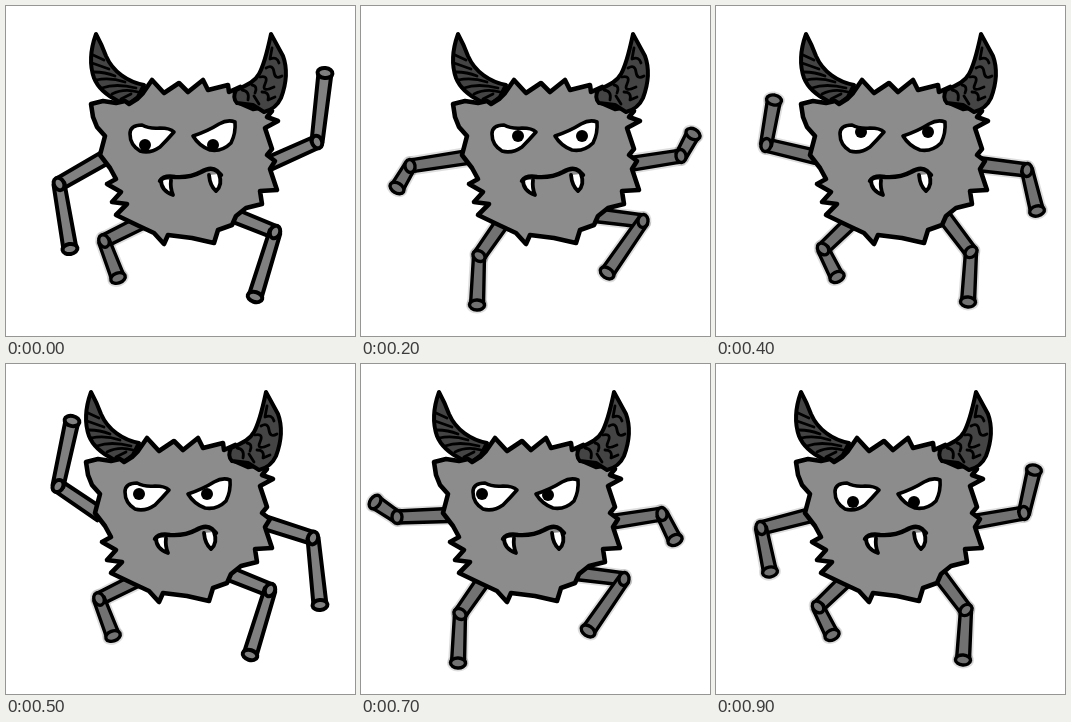
Recreate the animation shown at these times as an HTML page with a canvas. Size 349x330 px, loop 1000 ms.

```html
<!DOCTYPE html>
<html lang="en">
<head>
<meta charset="utf-8">
<title>Dancing monster</title>
<style>
  html, body { margin: 0; width: 100%; height: 100%; overflow: hidden; background: #fff; }
  canvas { display: block; width: 349px; height: 330px; }
</style>
</head>
<body>
<canvas id="stage" width="349" height="330"></canvas>
<script>
const ctx = document.getElementById('stage').getContext('2d');
ctx.lineJoin = ctx.lineCap = 'round';

const STEP = 100, STEPS = 10;
const FUR = '#8c8c8c', HORN = '#444', LIMB = '#808080', SOFT_LIMB = '#727272';

// Sideways sway of the body
const sway = [0, 5, 7, 5, 0, -5, -9, -12, -9, -5];

// Elbow x, y, hand x, y on the stage
const leftArm = [
  [53, 178, 64, 243], [54, 165, 62, 208], [49, 160, 36, 182], [50, 152, 30, 138],
  [50, 139, 58, 94], [52, 122, 66, 57], [44, 138, 50, 94], [36, 153, 14, 138],
  [36, 160, 22, 182], [45, 164, 54, 208]
];
const rightArm = [
  [311, 136, 319, 67], [318, 151, 326, 107], [320, 150, 332, 128], [318, 149, 325, 176],
  [311, 164, 321, 205], [307, 174, 314, 241], [303, 163, 313, 205], [301, 150, 314, 176],
  [302, 150, 318, 128], [308, 149, 318, 106]
];

// Knee x, y, foot x, y relative to the body; the step repeats twice per loop
const leftLeg = [
  [98, 235, 112, 272], [107, 246, 113, 288], [111, 250, 109, 299],
  [118, 251, 140, 280], [107, 243, 121, 271]
];
const rightLeg = [
  [269, 226, 249, 291], [276, 214, 254, 274], [275, 215, 239, 267],
  [270, 230, 235, 281], [255, 246, 252, 296]
];

// Left pupil x, y, right pupil x, y relative to the body
const pupils = [
  [139, 139, 207, 139], [144, 135, 209, 137], [150, 130, 214, 130], [151, 121, 215, 124],
  [145, 126, 212, 126], [138, 130, 206, 130], [135, 130, 203, 130], [133, 130, 199, 131],
  [137, 136, 200, 136], [142, 138, 203, 138]
];

const body = new Path2D(`M85 98 L97 95 L110 97 L119 95 L123 98 L131 93 L137 87 L146 74
  L158 87 L173 77 L182 86 L197 74 L202 84 L222 79 L223 86 L234 81 L231 96 L247 103
  L259 101 L266 105 L261 111 L272 115 L259 122 L263 134 L266 143 L261 149 L269 155
  L264 163 L271 184 L254 185 L256 198 L240 202 L230 210 L226 219 L212 224 L208 237
  L186 232 L162 229 L158 238 L148 227 L133 220 L110 209 L121 198 L106 196 L115 186
  L101 178 L110 173 L104 162 L94 149 L99 130 L91 121 L87 111 Z`);
const leftHorn = new Path2D(`M90 28 C85 42 83 58 88 72 C92 82 100 89 112 95 L124 97
  L132 91 L138 79 C122 76 107 66 100 50 Q96 39 90 28 Z`);
const leftMarks = new Path2D(`M87 49 L98 54 M86 57 L103 63 M88 66 Q99 66 109 70
  M90 74 Q104 71 119 76 M96 82 Q110 77 130 82 M106 88 Q118 82 132 86 M115 93 L125 88`);
const rightHorn = new Path2D(`M265 28 C262 42 259 57 253 68 C248 77 238 80 230 84
  Q226 92 231 97 L247 99 L258 106 Q270 103 275 92 C281 76 281 61 277 50 Q271 39 265 28 Z`);
const rightMarks = new Path2D(`M266 42 L264 53 Q271 50 273 57 M260 62 Q267 58 268 66 T276 70
  M254 71 Q263 69 259 78 T268 81 M246 79 Q252 80 249 87 M236 84 Q244 85 242 94
  M256 86 Q264 86 262 94 L269 91 M248 90 L253 98`);
const leftEye = new Path2D(`M124 128 Q124 119 136 119 Q143 123 154 122 Q164 122 168 126
  Q161 134 154 141 Q144 148 134 145 Q124 139 124 128 Z`);
const rightEye = new Path2D(`M187 130 Q202 125 213 118 Q222 113 229 116 Q230 127 225 137
  Q216 146 204 144 Q193 140 187 130 Z`);
const mouth = new Path2D('M154 175 Q158 169 169 171 Q184 172 195 166 Q205 160 211 165 L215 169');
const fangs = new Path2D(`M155 174 Q155 185 167 189 Q164 182 165 174
  M203 169 Q204 180 210 185 Q217 179 213 168`);

function ink(path, fill, width) {
  ctx.lineWidth = width;
  ctx.strokeStyle = '#000';
  if (fill) {
    ctx.fillStyle = fill;
    ctx.fill(path);
  }
  ctx.stroke(path);
}

function tube(a, b, wa, wb) {
  const len = Math.hypot(b[0] - a[0], b[1] - a[1]) || 1;
  const nx = (a[1] - b[1]) / len / 2, ny = (b[0] - a[0]) / len / 2;
  const p = new Path2D();
  p.moveTo(a[0] + nx * wa, a[1] + ny * wa);
  p.lineTo(b[0] + nx * wb, b[1] + ny * wb);
  p.lineTo(b[0] - nx * wb, b[1] - ny * wb);
  p.lineTo(a[0] - nx * wa, a[1] - ny * wa);
  p.closePath();
  return p;
}

function oval(at, from, along, across) {
  const p = new Path2D();
  const turn = Math.atan2(at[1] - from[1], at[0] - from[0]);
  p.ellipse(at[0], at[1], along, across, turn, 0, Math.PI * 2);
  return p;
}

function limb(root, [jx, jy, ex, ey], soft) {
  const joint = [jx, jy], end = [ex, ey];
  const parts = [
    tube(root, joint, 13, 12),
    tube(joint, end, 11, 13),
    oval(joint, root, 5, 6.5),
    oval(end, joint, 5, 7.5)
  ];
  if (soft) {
    ctx.strokeStyle = 'rgba(0, 0, 0, .13)';
    ctx.lineWidth = 7;
    parts.forEach(p => ctx.stroke(p));
  }
  parts.forEach(p => ink(p, soft ? SOFT_LIMB : LIMB, soft ? 3.4 : 4));
}

function eye(shape, x, y) {
  ctx.fillStyle = '#fff';
  ctx.fill(shape);
  ctx.save();
  ctx.clip(shape);
  ctx.fillStyle = '#000';
  ctx.beginPath();
  ctx.arc(x, y, 6, 0, Math.PI * 2);
  ctx.fill();
  ctx.restore();
  ink(shape, null, 3.6);
}

function draw(i) {
  const soft = i % 5 !== 0;
  const [lx, ly, rx, ry] = pupils[i];
  const dx = sway[i];

  ctx.fillStyle = '#fff';
  ctx.fillRect(0, 0, 349, 330);
  limb([100 + dx, 151], leftArm[i], soft);
  limb([262 + dx, 158], rightArm[i], soft);

  ctx.save();
  ctx.translate(dx, 0);
  limb([134, 217], leftLeg[i % 5], true);
  limb([227, 209], rightLeg[i % 5], soft);
  ink(leftHorn, HORN, 4);
  ink(leftMarks, null, 2.8);
  ink(body, FUR, 4.6);
  ink(rightHorn, HORN, 4);
  ink(rightMarks, null, 2.8);
  eye(leftEye, lx, ly);
  eye(rightEye, rx, ry);
  ink(fangs, '#fff', 3.8);
  ink(mouth, null, 4.4);
  ctx.restore();
}

let start;
function tick(now) {
  start ??= now;
  draw(Math.floor((now - start) / STEP) % STEPS);
  requestAnimationFrame(tick);
}
draw(0);
requestAnimationFrame(tick);
</script>
</body>
</html>
```
